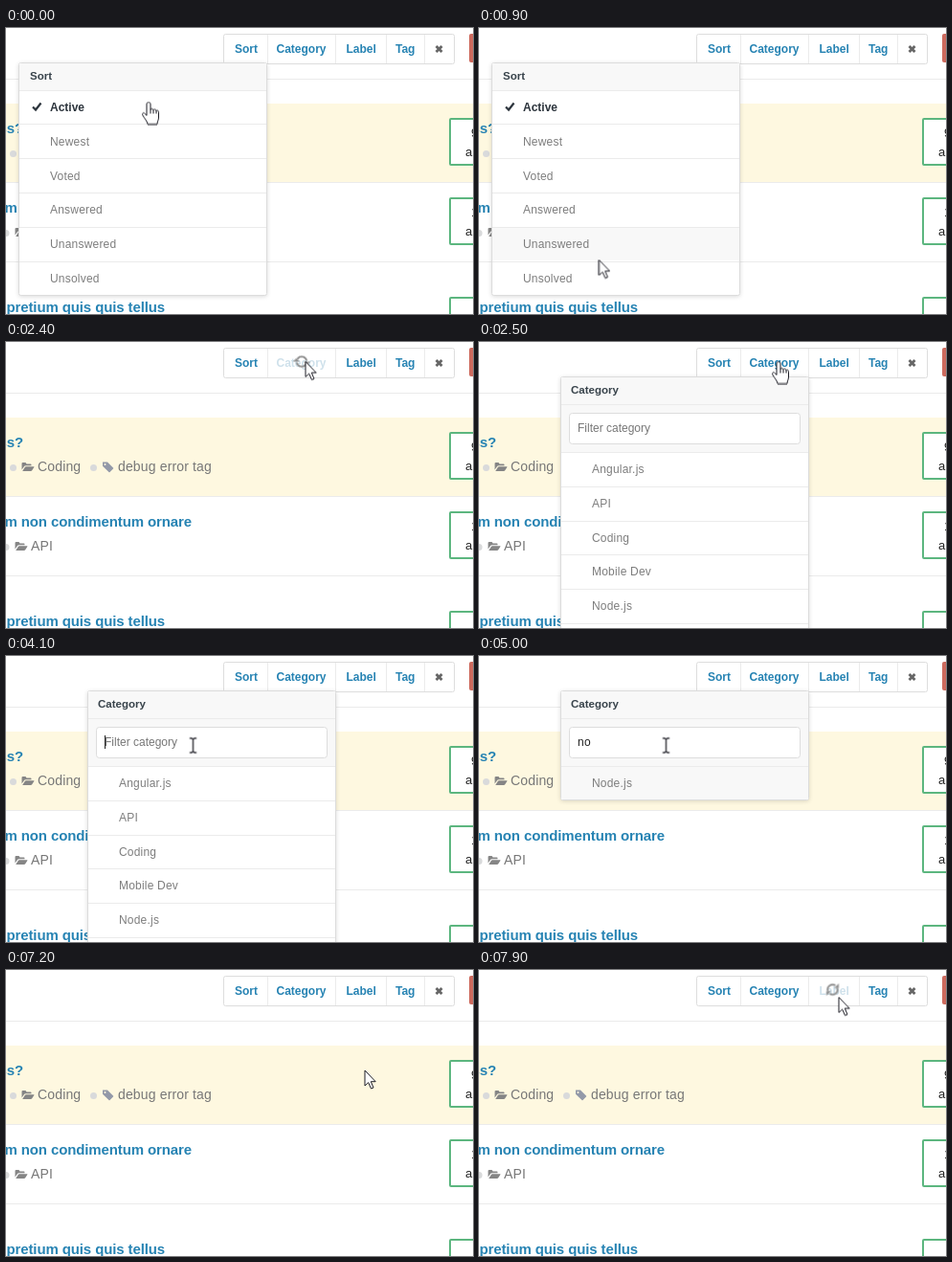
An HTML page that plays this animation: 488x299 px, repeating every 8000 ms.

```html
<!DOCTYPE html>
<html lang="en">
<head>
<meta charset="utf-8">
<title>Filter menus</title>
<style>
  html, body { margin: 0; width: 100%; height: 100%; overflow: hidden; background: #fff; }
  svg { display: block; width: 100%; height: 100%; }
  text { font: 12px "Liberation Sans", Arial, sans-serif; white-space: pre; }
  .title { font-weight: bold; font-size: 15px; letter-spacing: -.12px; fill: #2683b3; text-anchor: end; }
  .meta { font-size: 14px; fill: #777; letter-spacing: .15px; }
  .button { font-weight: bold; fill: #2683b3; }
  .head { font-weight: bold; font-size: 11.5px; fill: #38434b; }
  .item { fill: #7d7d7d; letter-spacing: .2px; }
  .chosen { fill: #2c343c; font-weight: bold; }
  .count { font-size: 13px; fill: #222; }
  .line { fill: none; stroke: #ebebeb; }
  .frame { fill: #fff; stroke: #ddd; }
  .panel { fill: #fff; stroke: #dcdcdc; filter: drop-shadow(0 1px 2px rgba(0, 0, 0, .14)); }
  .shade { fill: #f8f8f8; }

  .timed, .timed * { animation: 8s step-end infinite; }
  .timed .still, .still * { animation: none; }

  #sort { animation-name: sort; }
  @keyframes sort { 0% { visibility: visible } 28.75%, 100% { visibility: hidden } }
  #category { animation-name: category; }
  @keyframes category { 0% { visibility: hidden } 31.25% { visibility: visible } 90%, 100% { visibility: hidden } }
  #full { animation-name: full; }
  @keyframes full { 0% { opacity: 1 } 62.5%, 100% { opacity: 0 } }
  #found { animation-name: found; }
  @keyframes found { 0% { opacity: 0 } 62.5%, 100% { opacity: 1 } }

  #hover { animation-name: hover; }
  @keyframes hover {
    0% { opacity: 0; transform: translateY(0) }
    2.5% { opacity: 1; transform: translateY(0) }
    5% { opacity: 1; transform: translateY(36px) }
    7.5% { opacity: 1; transform: translateY(72px) }
    10% { opacity: 1; transform: translateY(107px) }
    12.5% { opacity: 1; transform: translateY(143px) }
    17.5% { opacity: 1; transform: translateY(107px) }
    18.75% { opacity: 1; transform: translateY(72px) }
    20% { opacity: 1; transform: translateY(0) }
    21.25%, 100% { opacity: 0; transform: translateY(0) }
  }

  #hint { animation-name: hint; }
  @keyframes hint { 0% { opacity: 1 } 56.25%, 100% { opacity: 0 } }
  #n { animation-name: n; }
  @keyframes n { 0% { opacity: 0 } 56.25%, 100% { opacity: 1 } }
  #o { animation-name: o; }
  @keyframes o { 0% { opacity: 0 } 58.75%, 100% { opacity: 1 } }
  #caret { animation-name: caret; }
  @keyframes caret {
    0% { opacity: 0; transform: none }
    42.5% { opacity: 1; transform: none }
    47.5% { opacity: 0; transform: none }
    50% { opacity: 1; transform: none }
    56.25% { opacity: 1; transform: translateX(7px) }
    58.75% { opacity: 1; transform: translateX(14px) }
    62.5%, 100% { opacity: 0; transform: translateX(14px) }
  }

  #categoryButton { animation-name: loadCategory; }
  @keyframes loadCategory { 0% { fill: #2683b3 } 28.75% { fill: #cfe1eb } 31.25%, 100% { fill: #2683b3 } }
  #labelButton { animation-name: loadLabel; }
  @keyframes loadLabel { 0% { fill: #2683b3 } 97.5%, 100% { fill: #cfe1eb } }
  #spinner { animation-name: spinner; }
  @keyframes spinner {
    0% { opacity: 0; transform: translate(309px, 20.5px) }
    28.75% { opacity: 1; transform: translate(309px, 20.5px) }
    31.25% { opacity: 0; transform: translate(369.5px, 20.5px) }
    97.5%, 100% { opacity: 1; transform: translate(369.5px, 20.5px) }
  }
  #wheel { animation: wheel .8s steps(8) infinite; }
  @keyframes wheel { from { transform: rotate(45deg) } to { transform: rotate(405deg) } }

  #pointer { animation-name: pointer; }
  @keyframes pointer {
    0% { transform: translate(149px, 77.5px); animation-timing-function: steps(9) }
    11.25% { transform: translate(125.5px, 242.5px) }
    12.5% { transform: translate(125px, 248px); animation-timing-function: steps(3) }
    16.25% { transform: translate(125px, 254px) }
    17.5% { transform: translate(160px, 225px) }
    18.75% { transform: translate(205px, 185px) }
    20% { transform: translate(255px, 130px) }
    21.25% { transform: translate(291px, 79px) }
    22.5% { transform: translate(312px, 17.5px) }
    25% { transform: translate(306.5px, 19.5px) }
    30% { transform: translate(313px, 20.5px) }
    38.75% { transform: translate(313px, 20.5px); animation-timing-function: steps(3) }
    42.5% { transform: translate(195.5px, 93.5px) }
    83.75% { transform: translate(353px, 147.5px) }
    85% { transform: translate(374px, 149px) }
    86.25% { transform: translate(378px, 142px) }
    87.5% { transform: translate(375px, 132px) }
    90% { transform: translate(375px, 105px) }
    91.25% { transform: translate(375px, 65px) }
    92.5% { transform: translate(376px, 31.5px) }
    95%, 100% { transform: translate(376px, 28.5px) }
  }
  #hand { animation-name: hand; }
  @keyframes hand {
    0% { opacity: 1 } 11.25% { opacity: 0 } 12.5% { opacity: 1 } 17.5% { opacity: 0 }
    22.5% { opacity: 1 } 25% { opacity: 0 } 31.25% { opacity: 1 } 40% { opacity: 0 }
    92.5% { opacity: 1 } 97.5%, 100% { opacity: 0 }
  }
  #beam { animation-name: beam; }
  @keyframes beam {
    0% { opacity: 0 } 25% { opacity: 1 } 28.75% { opacity: 0 }
    42.5% { opacity: 1 } 83.75%, 100% { opacity: 0 }
  }
  #arrow { animation-name: arrow; }
  @keyframes arrow {
    0% { opacity: 0 } 11.25% { opacity: 1 } 12.5% { opacity: 0 } 17.5% { opacity: 1 }
    22.5% { opacity: 0 } 28.75% { opacity: 1 } 31.25% { opacity: 0 } 40% { opacity: 1 }
    42.5% { opacity: 0 } 83.75% { opacity: 1 } 92.5% { opacity: 0 } 97.5%, 100% { opacity: 1 }
  }
</style>
</head>
<body>
<svg viewBox="0 0 488 299">
  <defs>
    <g id="folder" fill="#858585">
      <path d="M0 8V1.5Q0 .5 1 .5H4L5 2H9Q10 2 10 3V3.8H4Q3 3.8 2.3 4.7Z"/>
      <path d="M.7 9.5 3.2 5.4Q3.6 4.7 4.5 4.7H12.5Q13.3 4.7 12.8 5.6L10.7 8.8Q10.2 9.5 9.4 9.5Z"/>
    </g>
    <g id="answers">
      <rect x="464" width="60" height="48" rx="1" fill="#fff" stroke="#5cb67f" stroke-width="2"/>
      <text class="count" x="480" y="39">answers</text>
    </g>
  </defs>

  <!-- Question list -->
  <path class="line" d="M0 53.5H488"/>
  <path fill="#fef8e0" d="M0 79H488V161H0Z"/>
  <path class="line" d="M0 161.5H488M0 244.5H488"/>
  <text class="title" x="18" y="110">ss?</text>
  <text class="title" x="194" y="193">am non condimentum ornare</text>
  <text class="title" x="166" y="297">pretium quis quis tellus</text>
  <g fill="#d9dadb">
    <circle cx="7.5" cy="131.5" r="3.5"/><circle cx="91.5" cy="131.5" r="3.5"/><circle cx="0" cy="214.5" r="3.5"/>
  </g>
  <use href="#folder" x="16.500" y="125.500"/>
  <use href="#folder" x="9.500" y="208.500"/>
  <text class="meta" x="33" y="135">Coding</text>
  <text class="meta" x="26" y="218">API</text>
  <path fill="#9399a8" fill-rule="evenodd" d="M101 125.500H106L112 131.500Q112.500 132 112 132.500L108.500 136Q108 136.500 107.500 136L101 129.800ZM103.500 127A1 1 0 1 0 103.500 129 1 1 0 1 0 103.500 127Z"/>
  <text class="meta" x="117" y="135">debug error tag</text>
  <use href="#answers" y="95"/><use href="#answers" y="178"/><use href="#answers" y="282"/>
  <text class="count" x="486" y="114" font-weight="bold">9</text>
  <text class="count" x="486" y="197">1</text>

  <!-- Toolbar -->
  <rect class="frame" x="227.500" y="6.500" width="241" height="31" rx="2"/>
  <path class="line" d="M273.500 7V37M344.500 7V37M397.500 7V37M437.500 7V37"/>
  <rect x="484" y="6" width="20" height="30" rx="2" fill="#cd6a5e"/>
  <g class="timed">
    <text class="button still" x="239" y="26">Sort</text>
    <text class="button" id="categoryButton" x="282.500" y="26">Category</text>
    <text class="button" id="labelButton" x="355.500" y="26">Label</text>
    <text class="button still" x="407" y="26">Tag</text>
  </g>
  <path d="M449.500 19 455.500 25M455.500 19 449.500 25" stroke="#666" stroke-width="2.800"/>

  <g class="timed">
    <g id="spinner">
      <g id="wheel">
        <path class="still" d="M-5 1.500A5.200 5.200 0 0 1 3 -4.200M5 -1.500A5.200 5.200 0 0 1 -3 4.200" fill="none" stroke="#929292" stroke-width="2"/>
        <path class="still" d="M1.500 -1.500H6.500V-6.500ZM-1.500 1.500H-6.500V6.500Z" fill="#929292"/>
      </g>
    </g>

    <g id="sort">
      <g class="still">
        <rect class="panel" x="13.500" y="36.500" width="259" height="243" rx="2"/>
        <path class="shade" d="M14 37H272V65H14Z"/>
      </g>
      <path class="shade" id="hover" d="M14 101H272V136H14Z"/>
      <g class="still">
        <path class="line" d="M14 65.500H272M14 100.500H272M14 136.500H272M14 172.500H272M14 208.500H272M14 244.500H272"/>
        <text class="head" x="25" y="54">Sort</text>
        <path d="M28 82.500 31 85.500 36.500 78.500" fill="none" stroke="#2c343c" stroke-width="2.200"/>
        <text class="chosen" x="46" y="87">Active</text>
        <text class="item" x="46" y="123">Newest</text>
        <text class="item" x="46" y="159">Voted</text>
        <text class="item" x="46" y="194">Answered</text>
        <text class="item" x="46" y="230">Unanswered</text>
        <text class="item" x="46" y="266">Unsolved</text>
      </g>
    </g>

    <g id="category">
      <g id="full">
        <g class="still">
          <rect class="panel" x="85.500" y="36.500" width="259" height="280" rx="2"/>
          <path class="line" d="M86 151.500H344M86 187.500H344M86 222.500H344M86 258.500H344M86 294.500H344"/>
          <text class="item" x="118" y="137">Angular.js</text>
          <text class="item" x="118" y="173">API</text>
          <text class="item" x="118" y="209">Coding</text>
          <text class="item" x="118" y="244">Mobile Dev</text>
          <text class="item" x="118" y="280">Node.js</text>
        </g>
      </g>
      <g id="found">
        <g class="still">
          <rect class="panel" x="85.500" y="36.500" width="259" height="114" rx="2"/>
          <path class="shade" d="M86 116H344V150H86Z"/>
          <text class="item" x="118" y="137">Node.js</text>
        </g>
      </g>
      <g class="still">
        <path class="shade" d="M86 37H344V115H86Z"/>
        <path class="line" d="M86 65.500H344M86 115.500H344"/>
        <text class="head" x="96" y="54">Category</text>
        <rect class="frame" x="94.500" y="74.500" width="241" height="32" rx="3"/>
      </g>
      <text id="hint" x="103" y="94" fill="#777">Filter category</text>
      <text id="n" x="103" y="94" fill="#222">n</text>
      <text id="o" x="110" y="94" fill="#222">o</text>
      <path id="caret" d="M103.500 83V97" stroke="#222"/>
    </g>

    <g id="pointer" fill="#fff" stroke="#1c1c24" stroke-linejoin="round">
      <g id="hand">
        <path class="still" d="M-2 14V2C-2 -.5 2 -.5 2 2V8C2 6.500 5 6.500 5 8.500C5.500 7 8 7.200 8 9.500C8.500 8 10.500 8.500 10.500 10.500V16C10.500 19 9 20 9 23H-1C-1 20.500 -4 17.500 -6 14C-7.500 11.500 -5 10.500 -3.700 12Z"/>
        <path class="still" d="M2 8V12M5 8.500V12M8 9.500V12" fill="none"/>
      </g>
      <path id="beam" d="M-3.500 -7.500H-1.500L0 -6.500 1.500 -7.500H3.500M0 -6.500V6.500M-3.500 7.500H-1.500L0 6.500 1.500 7.500H3.500" fill="none" stroke-width="1.300"/>
      <path id="arrow" d="M0 0V16L3.700 12.700 6.500 19 9 18 6.300 11.700H11.200Z"/>
    </g>
  </g>
</svg>
</body>
</html>
```
